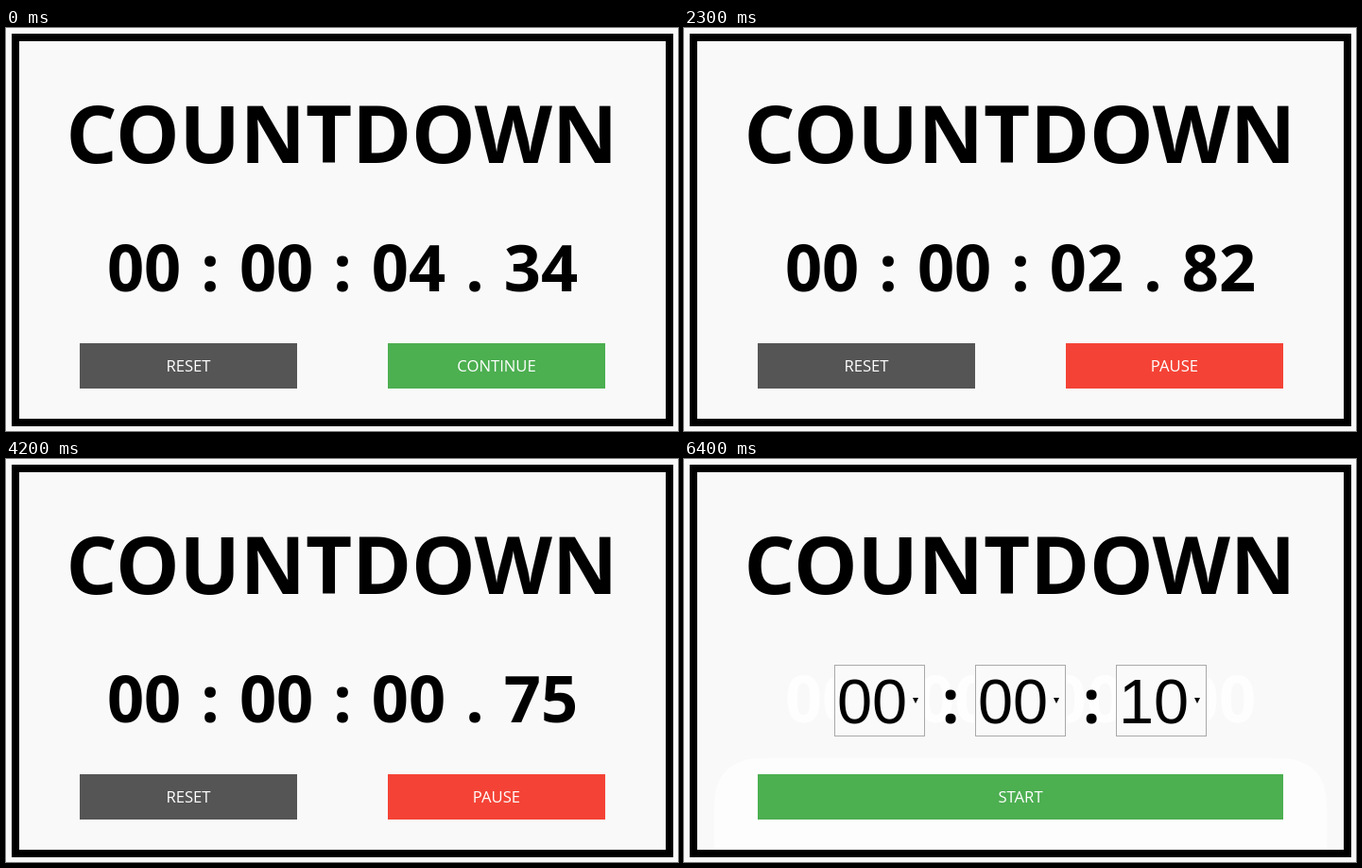
Animation of 711 by 427 pixels, one loop 7.5 s. Source, as an HTML page:

```html
<!DOCTYPE html>
<html lang="en">
<head>
<meta charset="utf-8">
<title>Countdown</title>
<style>
  html, body { margin: 0; width: 100%; height: 100%; overflow: hidden; background: #f9f9f9; }
  svg { position: absolute; left: 0; top: 0; }
  text { font-family: "Open Sans", "Noto Sans", sans-serif; font-weight: 700; text-anchor: middle; white-space: pre; }
  #title { font-size: 85px; }
  .digits { font-size: 68.5px; word-spacing: 3.3px; }
  .colon { font-size: 64px; }
  .field { font: 400 66.67px "Liberation Sans", Arial, sans-serif; text-anchor: start; }
  .button {
    position: absolute; top: 334px; height: 48px;
    color: #fff; font: 500 16.67px/48px "Open Sans", "Noto Sans", sans-serif; text-align: center;
  }
</style>
</head>
<body>
<svg width="711" height="427">
  <rect x="10" y="10" width="692" height="408" fill="none" stroke="#000" stroke-width="8"/>
  <text id="title" x="355.3" y="143">COUNTDOWN</text>
  <text id="timer" class="digits" x="356" y="279.3"></text>
  <g id="picker">
    <path d="M32 414V368Q32 317 84 317H628Q680 317 680 368V414Z" fill="#fdfdfd"/>
    <text class="digits" x="356" y="279.3" fill="#fefefe">00 : 00 : 00 . 00</text>
    <text class="colon" x="282" y="280">:</text>
    <text class="colon" x="431" y="280">:</text>
  </g>
</svg>
<div class="button" id="left"></div>
<div class="button" id="right"></div>
<svg id="cursor" width="18" height="26" viewBox="0 0 18 26">
  <path d="M5 14V3Q5 1 6.7 1T8.4 3V9Q11 8 11.5 10Q14 9 14.5 11Q17 10.5 17 13V17Q17 20 15 22V24H7V22L2 16Q0 13 2 12.5Q3.5 12.5 5 14Z"
    fill="#fff" stroke="#000" stroke-width="1.2" stroke-linejoin="round"/>
  <path d="M8.4 9V13M11.5 10V13.5M14.5 11V14" stroke="#000"/>
</svg>
<script>
const LOOP = 7500;
const GREY = '#555', GREEN = '#4caf50', RED = '#f44336';
const byId = id => document.getElementById(id);
const [timer, picker, left, right, cursor] = ['timer', 'picker', 'left', 'right', 'cursor'].map(byId);

['00', '00', '10'].forEach((value, i) => {
  const x = 159 + 149 * i;
  picker.insertAdjacentHTML('beforeend', `
    <rect x="${x + .5}" y="218.5" width="95" height="75" fill="#fafafa" stroke="#a9a9a9"/>
    <text class="field" x="${x + 3}" y="280">${value}</text>
    <path d="M${x + 83} 253h6l-3 6z"/>`);
});

// Linear interpolation through [time, value] points, clamped at both ends.
function track(points, t) {
  if (t <= points[0][0]) return points[0][1];
  for (let i = 1; i < points.length; i++) {
    const [t0, v0] = points[i - 1], [t1, v1] = points[i];
    if (t < t1) return v0 + (v1 - v0) * (t - t0) / (t1 - t0);
  }
  return points.at(-1)[1];
}

// Hundredths of a second left on the clock.
const COUNT = [[930, 434], [1600, 360], [3000, 204], [4200, 75], [4900, 0]];

// One visit of the pointer: it rises onto a button, clicks and leaves downwards.
const VISITS = [
  { start: 500, rest: 800, click: 950, end: 1200, x: 535 },
  { start: 5800, rest: 6050, click: 6150, end: 6400, x: 372 },
];
const hoverAt = ({ start, rest, click, end }, t) =>
  track([[start + 50, 0], [rest, 1], [click + 50, 1], [end, 0]], t);

function setButton(el, label, color, x, width, hover) {
  el.textContent = label;
  el.style.cssText = `left:${x}px; width:${width}px; background:${color};
    transform:scale(${1 + .05 * hover});
    box-shadow:0 14px 28px rgba(0,0,0,${.25 * hover}), 0 10px 10px rgba(0,0,0,${.22 * hover})`;
}

function render(t) {
  t = Math.floor(t / 100) * 100;
  const [resume, reset] = VISITS;
  const done = t >= 4900, picking = t >= reset.click;
  const pad = n => String(n).padStart(2, '0');
  const count = Math.round(track(COUNT, t));

  timer.textContent = `00 : 00 : ${pad(Math.floor(count / 100))} . ${pad(count % 100)}`;
  timer.style.display = picking ? 'none' : '';
  picker.style.display = picking ? '' : 'none';

  right.hidden = done;
  if (done) {
    setButton(left, picking ? 'START' : 'RESET', picking ? GREEN : GREY, 78, 556, hoverAt(reset, t));
  } else {
    const running = t >= resume.click;
    setButton(left, 'RESET', GREY, 78, 230, 0);
    setButton(right, running ? 'PAUSE' : 'CONTINUE', running ? RED : GREEN, 404, 230, hoverAt(resume, t));
  }

  const visit = VISITS.find(v => t >= v.start && t < v.end);
  cursor.style.display = visit ? '' : 'none';
  if (visit) {
    const y = track([[visit.start, 412], [visit.rest, 360], [visit.click + 50, 360], [visit.end, 427]], t);
    cursor.style.transform = `translate(${visit.x}px, ${y}px)`;
  }
}

const begin = performance.now();
(function frame() {
  render((performance.now() - begin) % LOOP);
  requestAnimationFrame(frame);
})();
</script>
</body>
</html>
```
